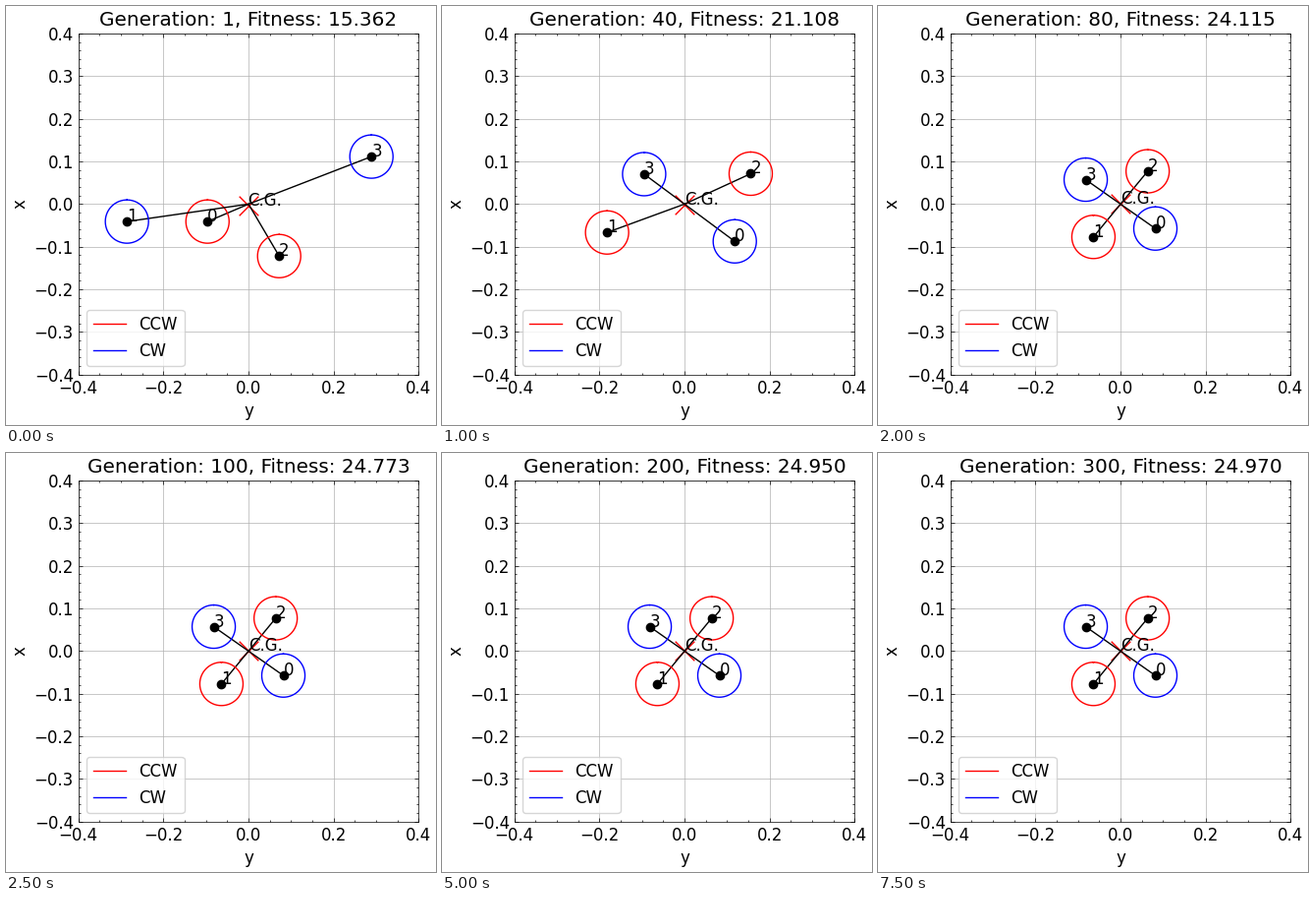
Recreate the animation shown at these times as a matplotlib script. Size 438x426 px, loop 8 s.

```python
import numpy as np
import matplotlib.pyplot as plt
from matplotlib.animation import FuncAnimation
from matplotlib.ticker import MultipleLocator

W, H, DPI = 438, 426, 100
LEFT, TOP, SIDE = 73.8, 28.15, 346.5
STEPS = 16
RADIUS = 0.0508
CG_WEIGHT = 0.2  # share of the rotor mass in the centre of gravity

plt.rcParams.update({
    "font.family": "DejaVu Sans", "font.size": 12,
    "axes.titlesize": "large", "axes.linewidth": 0.5,
    "lines.linewidth": 1.0, "grid.linewidth": 0.5,
    "xtick.top": True, "ytick.right": True,
})
for axis in ("xtick", "ytick"):
    plt.rcParams[f"{axis}.direction"] = "in"
    for kind, size in (("major", 3), ("minor", 1.5)):
        plt.rcParams[f"{axis}.{kind}.size"] = size
        plt.rcParams[f"{axis}.{kind}.width"] = 0.5

# random first designs, rotors as y + x*1j
FIRST = [
    ("rbrb", [-.0965 - .041j, -.286 - .041j, .072 - .122j, .289 + .1115j]),
    ("rrrb", [-.027 - .303j, .159 + .221j, .067 + .142j, -.0945 + .07j]),
]
# converged cross: arm length, arm angles, and how an unsettled arm deviates
ARM = 0.1
ANGLE = np.array([-35, 230.4, 50.4, 145])
STRETCH = np.array([0.31, 0.62, 0.47, 0.12])
TURN = np.array([1, 20, 17, 1])


def design(step):
    """Spin letters and rotor positions of the best design."""
    if step < len(FIRST):
        return FIRST[step]
    spread = max(0, 4 - step) ** 0.6
    arms = ARM * (1 + spread * STRETCH)
    return "brrb", arms * np.exp(1j * np.radians(ANGLE - spread * TURN))


def fitness(generation):
    return np.interp(generation, [1, 20, 60, 100, 140, 200, 300],
                     [15.362, 18.757, 23.458, 24.773, 24.896, 24.950, 24.970])


fig = plt.figure(figsize=(W / DPI, H / DPI), dpi=DPI, facecolor="white")
ax = fig.add_axes([LEFT / W, 1 - (TOP + SIDE) / H, SIDE / W, SIDE / H])
ax.set(xlim=(-0.4, 0.4), ylim=(-0.4, 0.4), xlabel="y", ylabel="x")
for axis, major, minor in ((ax.xaxis, 0.2, 0.05), (ax.yaxis, 0.1, 0.02)):
    axis.set_major_locator(MultipleLocator(major))
    axis.set_minor_locator(MultipleLocator(minor))
ax.grid(True)
ax.set_axisbelow(True)

title = ax.set_title("")
cg_mark = ax.scatter([0], [0], s=200, c="red", marker="x", linewidths=1, zorder=1)
cg_text = ax.text(0, 0, "C.G.")

theta = np.linspace(0, 2 * np.pi, 100)
ring = RADIUS * np.sin(theta), RADIUS * np.cos(theta)


def make_rotor(i):
    arm, = ax.plot([], [], "k-")
    hub, = ax.plot([], [], "ko", markersize=6)
    disc, = ax.plot([], [], "-")
    return arm, hub, disc, ax.text(0, 0, str(i))


rotors = [make_rotor(i) for i in range(4)]
keys = [ax.plot([], [], color=c, label=s)[0]
        for c, s in (("red", "CCW"), ("blue", "CW"))]
ax.legend(handles=keys, loc="lower left")


def update(step):
    generation = max(1, 20 * step)
    title.set_text(f"Generation: {generation}, Fitness: {fitness(generation):.3f}")
    spins, places = design(step)
    cg = CG_WEIGHT * np.mean(places)
    cg_mark.set_offsets([(cg.real, cg.imag)])
    cg_text.set_position((cg.real, cg.imag))
    for (arm, hub, disc, label), spin, place in zip(rotors, spins, places):
        x, y = place.real, place.imag
        arm.set_data([0, x], [0, y])
        hub.set_data([x], [y])
        disc.set_data(x + ring[0], y + ring[1])
        disc.set_color("red" if spin == "r" else "blue")
        label.set_position((x, y))
    return []


anim = FuncAnimation(fig, update, frames=STEPS, interval=500,
                     init_func=lambda: update(0), repeat=True, repeat_delay=0)
plt.show()
```
